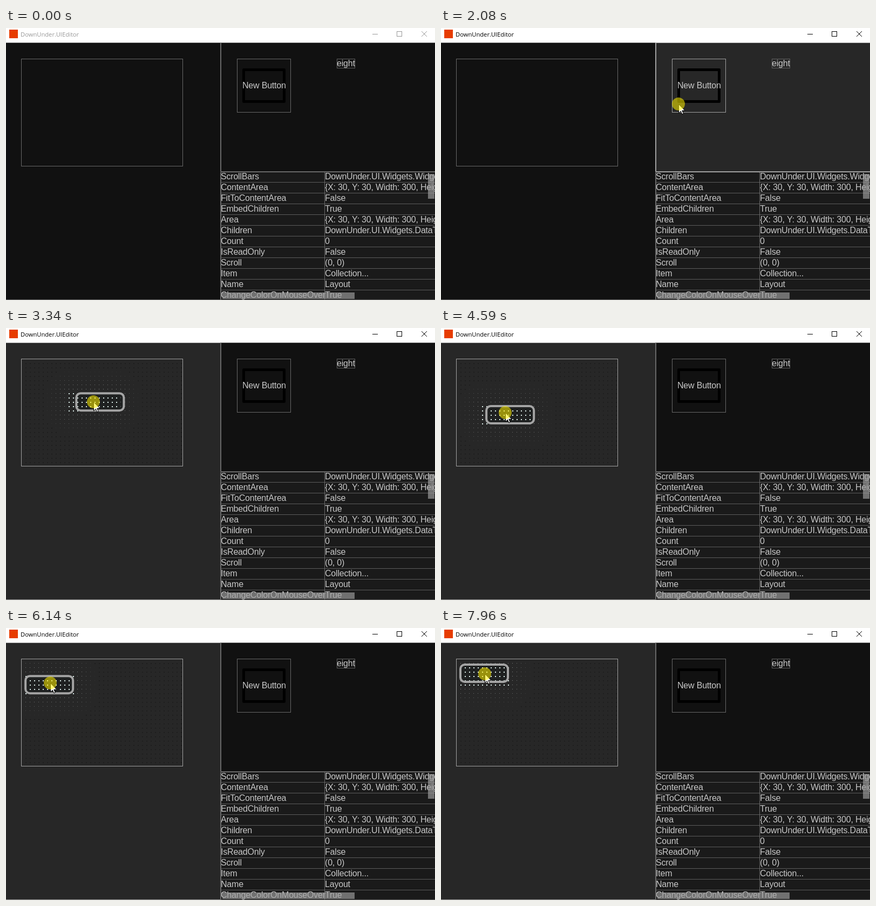
Recreate the animation shown at these times as an HTML page with a canvas. Size 795 by 505 pixels, loop 7990 ms.

```html
<!DOCTYPE html>
<html>
<head>
<meta charset="utf-8">
<style>
  html, body { margin: 0; width: 100%; height: 100%; overflow: hidden; background: #111; }
  canvas { display: block; }
</style>
</head>
<body>
<canvas id="stage" width="795" height="505"></canvas>
<script>
const ctx = document.getElementById('stage').getContext('2d');
const LOOP = 7990, STEP = 10, CELL = 8;
const BOX = { w: 88, h: 32 };

// Pointer path: time, x, y
const path = [
  [270, 800, 496], [1050, 603, 249], [1870, 495, 150], [2080, 440, 141],
  [2680, 290, 146], [3340, 162, 137], [3580, 161, 138], [4370, 152, 160],
  [4590, 119, 157], [5190, 98, 140], [5560, 95, 125], [5930, 82, 107],
  [6730, 82, 88], [6850, 82, 86], [6930, 86, 85], [7050, 86, 85],
  [7530, 82, 83], [7900, 81, 83.5], [7960, 81, 84.6], [7990, 81, 84.6]
];

const rows = [
  ['ScrollBars', 'DownUnder.UI.Widgets.WidgetScrollBars'],
  ['ContentArea', '{X: 30, Y: 30, Width: 300, Height: 200}'],
  ['FitToContentArea', 'False'],
  ['EmbedChildren', 'True'],
  ['Area', '{X: 30, Y: 30, Width: 300, Height: 200}'],
  ['Children', 'DownUnder.UI.Widgets.DataTypes'],
  ['Count', '0'],
  ['IsReadOnly', 'False'],
  ['Scroll', '(0, 0)'],
  ['Item', 'Collection...'],
  ['Name', 'Layout'],
  ['ChangeColorOnMouseOver', 'True']
];

const mix = (a, b, k) => a + (b - a) * k;
const grey = v => `rgb(${v},${v},${v})`.replace(/\d+\.\d+/g, n => Math.round(n));
const snap = (v, origin) => origin + CELL * Math.max(0, Math.round((v - origin) / CELL + 0.1));

function pointer(t) {
  if (t < path[0][0]) return { x: 900, y: 600 };
  const i = Math.max(1, path.findIndex(p => p[0] >= t));
  const [t0, x0, y0] = path[i - 1], [t1, x1, y1] = path[i];
  const k = (t - t0) / (t1 - t0);
  return { x: mix(x0, x1, k), y: mix(y0, y1, k) };
}

// Lagging values (hover fades and the ghost box) sampled once for the whole loop
function buildTrack() {
  const ease = tau => 1 - Math.exp(-STEP / tau);
  const track = [];
  let left = 0, right = 0, grid = 0, ghost = null;
  for (let t = 0; t < LOOP; t += STEP) {
    const p = pointer(t);
    const inside = t > 2080 && p.x < 328;
    const goal = { x: snap(p.x - BOX.w / 2, 36), y: snap(p.y - BOX.h / 2, 65) };
    left = mix(left, p.x < 397, ease(180));
    right = mix(right, p.x >= 397 && p.y < 267, ease(180));
    grid = mix(grid, inside, ease(70));
    if (inside) {
      ghost = ghost || { x: p.x - BOX.w / 2, y: p.y - BOX.h / 2 };
      ghost = { x: mix(ghost.x, goal.x, ease(63)), y: mix(ghost.y, goal.y, ease(63)) };
    }
    track.push({ p, left, right, grid, ghost, goal });
  }
  return track;
}
const track = buildTrack();

function fill(color, x, y, w, h) {
  ctx.fillStyle = color;
  ctx.fillRect(x, y, w, h);
}

function frame(color, x, y, w, h, line = 1) {
  ctx.strokeStyle = color;
  ctx.lineWidth = line;
  ctx.strokeRect(x + line / 2, y + line / 2, w - line, h - line);
}

function text(str, x, y) {
  ctx.font = '16px "Liberation Sans", Arial, sans-serif';
  ctx.letterSpacing = '-0.2px';
  ctx.fillStyle = '#c8c8c8';
  ctx.fillText(str, x, y);
}

function drawTitle(active) {
  const ink = active ? '#000' : '#999';
  fill('#fff', 0, 0, 795, 27);
  fill('#e73c00', 6, 3, 16, 16);
  ctx.font = '11.2px "Open Sans", "Noto Sans", sans-serif';
  ctx.letterSpacing = '0px';
  ctx.fillStyle = ink;
  ctx.fillText('DownUnder.UIEditor', 27, 16);
  fill(ink, 679, 11, 10, 1);
  frame(ink, 724, 6, 10, 10);
  ctx.beginPath();
  ctx.moveTo(770, 6); ctx.lineTo(780, 16);
  ctx.moveTo(780, 6); ctx.lineTo(770, 16);
  ctx.stroke();
}

function drawPalette(hover) {
  const edge = grey(mix(104, 160, hover));
  fill(grey(mix(17, 39, hover)), 398, 27, 397, 240);
  fill(edge, 398, 27, 397, 1);
  fill(edge, 397, 27, 2, 240);
  fill(edge, 398, 266, 397, 2);
  frame(edge, 428, 57, 100, 100);
  ctx.lineJoin = 'round';
  frame('#000', 438, 75, 80, 64, 5);
  ctx.lineJoin = 'miter';
  text('New Button', 438, 112);
  frame('#606060', 613, 57, 34, 18);
  text('eight', 613, 71);
}

function drawTable() {
  fill('#1a1a1a', 398, 268, 397, 237);
  rows.forEach(([name, value], i) => {
    const y = 281 + 20 * i;
    fill('#5c5c5c', 398, y + 5, 397, 1);
    text(name, 398, y);
    text(value, 591, y);
  });
  fill('#686868', 590, 268, 1, 237);
  fill('#686868', 397, 268, 2, 237);
  fill('rgba(160,160,160,.65)', 782, 271, 12, 46);
  fill('rgba(160,160,160,.65)', 401, 491, 245, 12);
  fill('#5c5c5c', 398, 504, 397, 1);
}

function drawDots({ grid, goal }) {
  for (let y = 65; y < 257; y += CELL) {
    for (let x = 36; x < 328; x += CELL) {
      const dx = Math.max(goal.x - x, 0, x - goal.x - BOX.w);
      const dy = Math.max(goal.y - y, 0, y - goal.y - BOX.h);
      const d = Math.hypot(dx, dy);
      if (d === 0) fill(`rgba(222,240,236,${grid})`, x, y, 2, 2);
      else if (d < 44) fill(`rgba(200,205,205,${grid * 0.75 * (1 - d / 44)})`, x, y, 1, 1);
      else fill(`rgba(0,0,0,${grid * 0.22})`, x, y, 2, 2);
    }
  }
}

function drawEditor(s) {
  const edge = grey(mix(104, 160, s.left));
  fill(grey(mix(17, 39, s.left)), 0, 27, 397, 478);
  fill(edge, 0, 27, 397, 1);
  fill(edge, 0, 504, 397, 1);
  frame(edge, 28, 57, 300, 200);
  if (!s.ghost) return;
  ctx.beginPath();
  ctx.roundRect(s.ghost.x, s.ghost.y, BOX.w, BOX.h, 8);
  ctx.fillStyle = `rgba(22,26,26,${0.4 * s.grid})`;
  ctx.fill();
  drawDots(s);
  ctx.beginPath();
  ctx.roundRect(s.ghost.x, s.ghost.y, BOX.w, BOX.h, 8);
  ctx.strokeStyle = `rgba(164,164,164,${s.grid})`;
  ctx.lineWidth = 4;
  ctx.stroke();
}

function drawPointer({ x, y }) {
  ctx.save();
  ctx.translate(Math.round(x), Math.round(y));
  const arrow = new Path2D('M.5 .5V17L4.3 13.3L6.8 19L9.3 18L6.8 12.3H12Z');
  ctx.fillStyle = '#fff';
  ctx.fill(arrow);
  ctx.strokeStyle = '#000';
  ctx.lineWidth = 1;
  ctx.stroke(arrow);
  ctx.beginPath();
  ctx.arc(0, 0, 12, 0, 7);
  ctx.fillStyle = 'rgba(255,240,0,.55)';
  ctx.fill();
  ctx.restore();
}

let start;
function draw(now) {
  start ??= now;
  const t = (now - start) % LOOP;
  const s = track[Math.floor(t / STEP)];
  drawEditor(s);
  drawTable();
  drawPalette(s.right);
  drawTitle(t >= 1500);
  drawPointer(s.p);
  requestAnimationFrame(draw);
}
requestAnimationFrame(draw);
</script>
</body>
</html>
```
